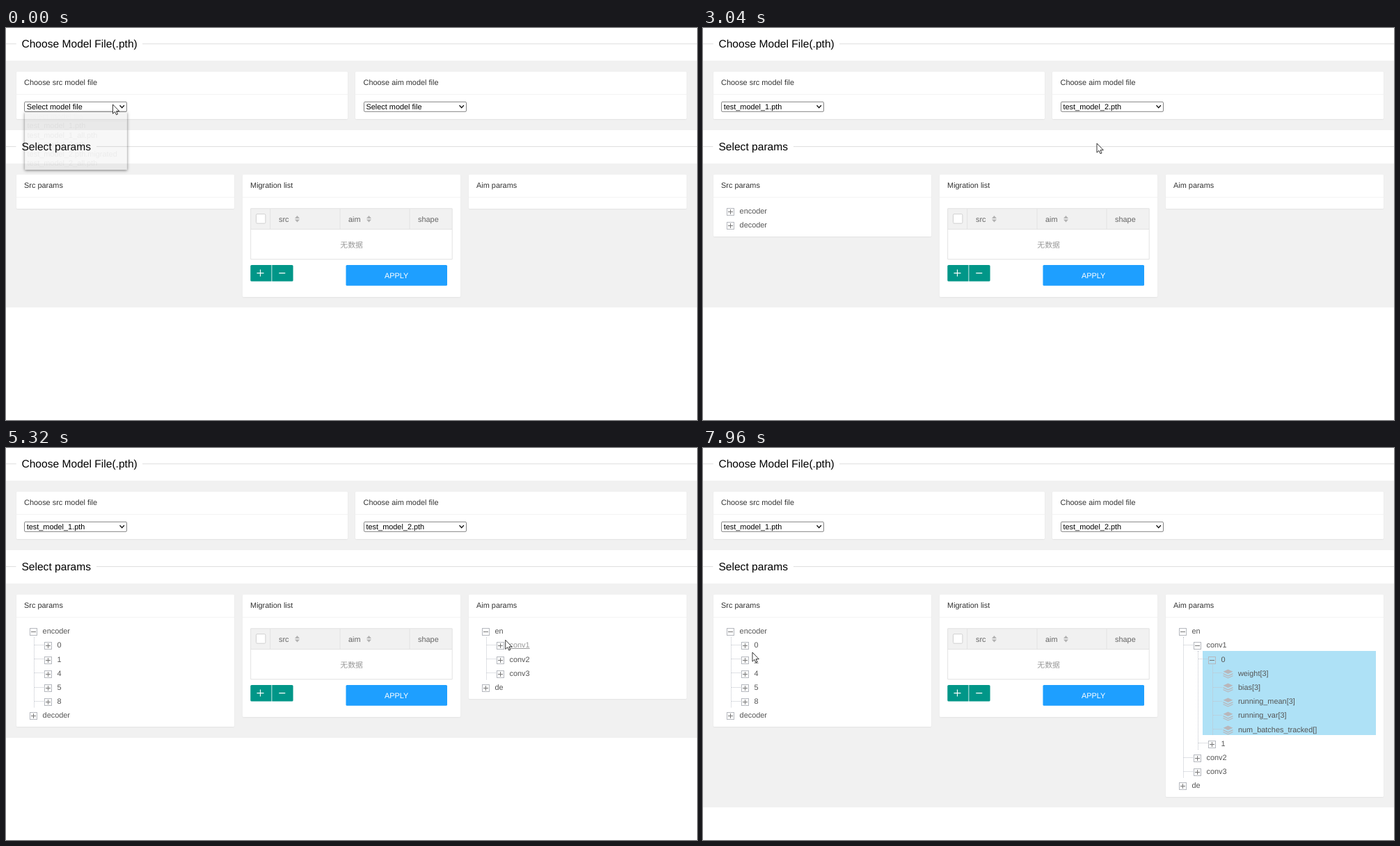
These frames come from a looping animation (993 px wide and 564 px high, 8000 ms). An HTML page:

```html
<!DOCTYPE html>
<html lang="en">
<head>
<meta charset="utf-8">
<title>Model migration</title>
<style>
  html, body { margin: 0; width: 100%; height: 100%; overflow: hidden; background: #fff; }
  body { position: relative; font: 10.92px "Liberation Sans", Arial, sans-serif; color: #333; text-rendering: geometricPrecision; cursor: default; }
  section { position: absolute; left: 0; width: 993px; box-sizing: border-box; padding: 15.5px 14.7px; display: flex; gap: 11.3px; align-items: flex-start; background: #f1f1f1; }
  .card { flex: 1; background: #fff; border-radius: 1.5px; box-shadow: 0 1px 2px rgba(0, 0, 0, .06); }
  .card h3 { margin: 0; padding-left: 11.4px; font: inherit; line-height: 33px; border-bottom: 1px solid #f3f3f3; height: 32.5px; }
  .files .card { height: 68px; }
  .tree { padding: 7.9px 11.7px 7.8px 19.3px; }
  .row { position: relative; display: flex; align-items: center; width: fit-content; height: 14.9px; padding-top: 5.3px; line-height: 14.9px; color: #555; white-space: nowrap; }
  .row .box { width: 9px; height: 9px; border: 1px solid #b5b8be; margin-right: 7.6px;
    background: linear-gradient(#777 0 0) center / 7px 1px no-repeat, linear-gradient(#777 0 0) center / 1px 7px no-repeat; }
  .open > .row .box { background: linear-gradient(#777 0 0) center / 7px 1px no-repeat; }
  .row svg { width: 15px; height: 14px; margin-right: 7px; }
  .row.hover { color: #999; text-decoration: underline; }
  .kids { position: relative; overflow: hidden; padding-left: 21px; }
  .kids::before { content: ""; position: absolute; left: 6px; top: 0; bottom: 0; border-left: 1px dotted #c0c4cc; }
  .kids .row::before { content: ""; position: absolute; left: -14px; top: 11px; width: 13px; border-top: 1px dotted #c0c4cc; }
  .set.picked { margin-left: -8px; padding-left: 8px; background: #aee1f6; }
  #chrome, #pointer { position: absolute; left: 0; top: 0; width: 993px; height: 564px; pointer-events: none; }
  #chrome .title { font-size: 15.6px; fill: #000; }
  .menu { position: absolute; top: 120.5px; width: 147.5px; height: 83px; background: rgba(0, 0, 0, .03); box-shadow: 0 1px 4px rgba(0, 0, 0, .5); }
  .menu div { box-sizing: border-box; height: 100%; border: .8px solid #777; background: #fff; color: #000; }
  .menu p { margin: 0; padding-left: 3px; height: 13.6px; line-height: 13px; }
  .menu p:first-child { color: #777; }
  .menu p.on { background: #1e90ff; color: #fff; }
  .menu p.on:first-child { background: #c8c8c8; color: #808080; }
</style>
</head>
<body>
<section class="files" style="top:47px;height:99.5px">
  <div class="card"><h3>Choose src model file</h3></div>
  <div class="card"><h3>Choose aim model file</h3></div>
</section>
<section style="top:195px">
  <div class="card"><h3>Src params</h3><div class="tree" id="src"></div></div>
  <div class="card" style="height:176px"><h3>Migration list</h3></div>
  <div class="card"><h3>Aim params</h3><div class="tree" id="aim"></div></div>
</section>

<svg id="chrome" viewBox="0 0 993 564">
  <defs>
    <g id="select">
      <rect x=".5" y=".5" width="147" height="14" rx="1.5" fill="#fff" stroke="#767676" stroke-width=".9"/>
      <path d="M137.5 5.5l3.2 3.4 3.2-3.4" fill="none" stroke="#111" stroke-width="1.3"/>
    </g>
    <path id="sort" d="M0 4L3.5 0 7 4zM0 5.5H7L3.5 9.5z" fill="#b2b2b2"/>
  </defs>
  <path d="M0 22.8H14.8M196 22.8H993M0 170.6H14.4M130 170.6H993" stroke="#dedede"/>
  <text class="title" x="22.4" y="28">Choose Model File(.pth)</text>
  <text class="title" x="22.4" y="175.8">Select params</text>
  <use href="#select" x="26" y="105.8"/>
  <use href="#select" x="514" y="105.8"/>
  <text id="srcValue" x="29.7" y="117.2"></text>
  <text id="aimValue" x="517.5" y="117.2"></text>

  <rect x="351.5" y="259.8" width="289.5" height="30" fill="#f1f1f1"/>
  <path d="M351.7 259.8H641.2V332.8H351.7zM351.7 289.6H641.2M379.7 260V289.6M480 260V289.6M580 260V289.6" fill="none" stroke="#e2e2e2"/>
  <rect x="359.5" y="267.7" width="13.4" height="13.4" rx="1.5" fill="#fff" stroke="#d0d0d0"/>
  <g fill="#666">
    <text x="392" y="278.6">src</text>
    <text x="492" y="278.6">aim</text>
    <text x="592" y="278.6">shape</text>
  </g>
  <use href="#sort" x="415" y="270"/>
  <use href="#sort" x="518" y="270"/>
  <text x="496.6" y="315.6" text-anchor="middle" fill="#999" font-family="'Noto Sans CJK SC','Noto Sans CJK',sans-serif">无数据</text>
  <path d="M353 341H381.5V364.5H353Q351.3 364.5 351.3 363V342.5Q351.3 341 353 341zM382.3 341H411Q412.6 341 412.6 342.5V363Q412.6 364.5 411 364.5H382.3z" fill="#009688"/>
  <path d="M360.5 352.6H370.5M365.5 347.6V357.6M392.3 352.6H401.3" stroke="#fff" stroke-width="1.1"/>
  <rect x="488.5" y="341" width="145.5" height="29.8" rx="1.5" fill="#1e9fff"/>
  <text x="561.2" y="359.9" text-anchor="middle" fill="#fff">APPLY</text>
</svg>

<div class="menu" id="srcMenu" style="left:26.6px"><div></div></div>
<div class="menu" id="aimMenu" style="left:514.8px"><div></div></div>

<svg id="pointer" viewBox="0 0 993 564">
  <g id="cursor" fill="#fff" stroke="#111" stroke-width=".85" stroke-linejoin="round">
    <path id="arrow" d="M0 0V13.2L3 10.4 5 14.8 7 14 5.1 9.7H9.3Z"/>
    <path id="hand" d="M-1.4 1.2Q0-.7 1.2 1.2V5.6Q2.2 4.6 3.1 5.9 4.4 5.2 5 6.5 6.6 6.2 6.5 8V11Q6.4 13 5.2 14V15.8H-2Q-2.4 13.4-5 10.5-5.8 8.6-4.4 8.6-3 8.8-1.4 10.6ZM1.2 5.6V8.6M3.1 5.9V8.8M5 6.5V9"/>
  </g>
</svg>

<script>
const LOOP = 8000, STEP = 40, ROW = 20.2, SLIDE = 200;
const $ = id => document.getElementById(id);
const clamp = v => Math.max(0, Math.min(1, v));
const prompt = 'Select model file';
const models = ['test_model_1.pth', 'test_model_1_all.pth', 'test_model_2.pth', 'test_model_2.pth.migrated', 'test_model_2_all.pth'];
const layers = '<svg viewBox="0 0 15 14" fill="#b9b7bb"><path d="M7.5 .5L14.5 3.8 7.5 7.1 .5 3.8zM.5 6L7.5 9.3 14.5 6V7.4L7.5 10.7 .5 7.4zM.5 9L7.5 12.3 14.5 9V10.2L7.5 13.5 .5 10.2z"/></svg>';

function make(parent, tag, className, html = '') {
  const el = document.createElement(tag);
  el.className = className;
  el.innerHTML = html;
  return parent.appendChild(el);
}

// Adds a tree entry; openAt is when its children slide out.
const folders = [];
function addNode(parent, { label, kids, openAt, leaf, pickAt }) {
  const set = make(parent, 'div', 'set');
  make(set, 'div', 'row', (leaf ? layers : '<i class="box"></i>') + `<span>${label}</span>`);
  if (!kids) return;
  const pack = make(set, 'div', 'kids');
  kids.forEach(kid => addNode(pack, kid));
  folders.push({ set, pack, count: kids.length, openAt, pickAt: pickAt || Infinity });
}
const closed = label => ({ label });
const leaf = label => ({ label, leaf: true });

const zero = { label: '0', openAt: 6950, pickAt: 7600,
  kids: ['weight[3]', 'bias[3]', 'running_mean[3]', 'running_var[3]', 'num_batches_tracked[]'].map(leaf) };
const conv1 = { label: 'conv1', openAt: 5829, kids: [zero, closed('1')] };
const panels = [
  { name: 'src', openAt: 0, pickAt: 1600, loadAt: 1640, value: models[0],
    nodes: [{ label: 'encoder', openAt: 3909, kids: ['0', '1', '4', '5', '8'].map(closed) }, closed('decoder')] },
  { name: 'aim', openAt: 2160, pickAt: 3040, loadAt: 3120, value: models[2],
    nodes: [{ label: 'en', openAt: 4790, kids: [conv1, closed('conv2'), closed('conv3')] }, closed('de')] }
];
for (const panel of panels) {
  const root = make($(panel.name), 'div', '');
  panel.nodes.forEach(node => addNode(root, node));
  const list = $(panel.name + 'Menu').firstChild;
  [prompt, ...models].forEach(text => make(list, 'p', '', text));
  Object.assign(panel, { root, list, menu: list.parentNode, text: $(panel.name + 'Value') });
}

// Pointer stops: time, x, y
const stops = [
  [0, 153.5, 110], [40, 153.5, 110], [840, 138, 137], [960, 122.7, 138], [1600, 122.7, 138],
  [1960, 637, 112], [2200, 637, 112], [2400, 592, 131.5], [2800, 566, 166], [3080, 566, 166],
  [3500, 30, 298], [3800, 85.5, 266], [3960, 85.5, 266], [4380, 733, 262], [4540, 695.5, 265],
  [4960, 695.5, 265], [5600, 733, 284], [5830, 733, 284], [6000, 744.5, 312.6], [6240, 744, 371],
  [6660, 744, 371], [6800, 746, 304], [7640, 746, 304], [7960, 71, 294], [8000, 71, 294]
];
function pointerAt(t) {
  const i = Math.max(1, stops.findIndex(s => s[0] >= t));
  const [t0, x0, y0] = stops[i - 1], [t1, x1, y1] = stops[i];
  const p = clamp((t - t0) / (t1 - t0)), e = p * p * (3 - 2 * p);
  return [x0 + (x1 - x0) * e, y0 + (y1 - y0) * e];
}

function drawPanel(panel, t, y) {
  const shown = t >= panel.openAt && t < panel.pickAt;
  panel.menu.style.display = shown ? '' : 'none';
  panel.list.style.opacity = clamp(.04 + (t - panel.openAt) / 160);
  const active = Math.max(0, Math.floor((y - 120.5) / 13.6));
  [...panel.list.children].forEach((p, i) => p.classList.toggle('on', i === active));
  panel.text.textContent = t < panel.pickAt ? prompt : panel.value;
  panel.root.style.display = t < panel.loadAt ? 'none' : '';
}

function drawFolder({ set, pack, count, openAt, pickAt }, t) {
  const p = clamp((t - openAt) / SLIDE);
  pack.style.display = p ? '' : 'none';
  pack.style.height = p < 1 ? (.5 - Math.cos(Math.PI * p) / 2) * count * ROW + 'px' : 'auto';
  set.classList.toggle('open', p > 0);
  set.classList.toggle('picked', t >= pickAt);
}

const rows = document.querySelectorAll('.row');
function draw(t) {
  const [x, y] = pointerAt(t), [px, py] = pointerAt(Math.max(0, t - STEP));
  panels.forEach(panel => drawPanel(panel, t, y));
  folders.forEach(folder => drawFolder(folder, t));
  const under = document.elementFromPoint(x, y);
  const hovered = under && under.closest('.row');
  rows.forEach(row => row.classList.toggle('hover', row === hovered));
  // The pointer keeps its arrow while it is travelling.
  const hand = hovered && Math.hypot(x - px, y - py) < 2;
  $('hand').style.display = hand ? '' : 'none';
  $('arrow').style.display = hand ? 'none' : '';
  $('cursor').setAttribute('transform', `translate(${x} ${y})`);
}

function tick() {
  draw(Math.floor(performance.now() % LOOP / STEP) * STEP);
  requestAnimationFrame(tick);
}
tick();
</script>
</body>
</html>
```
